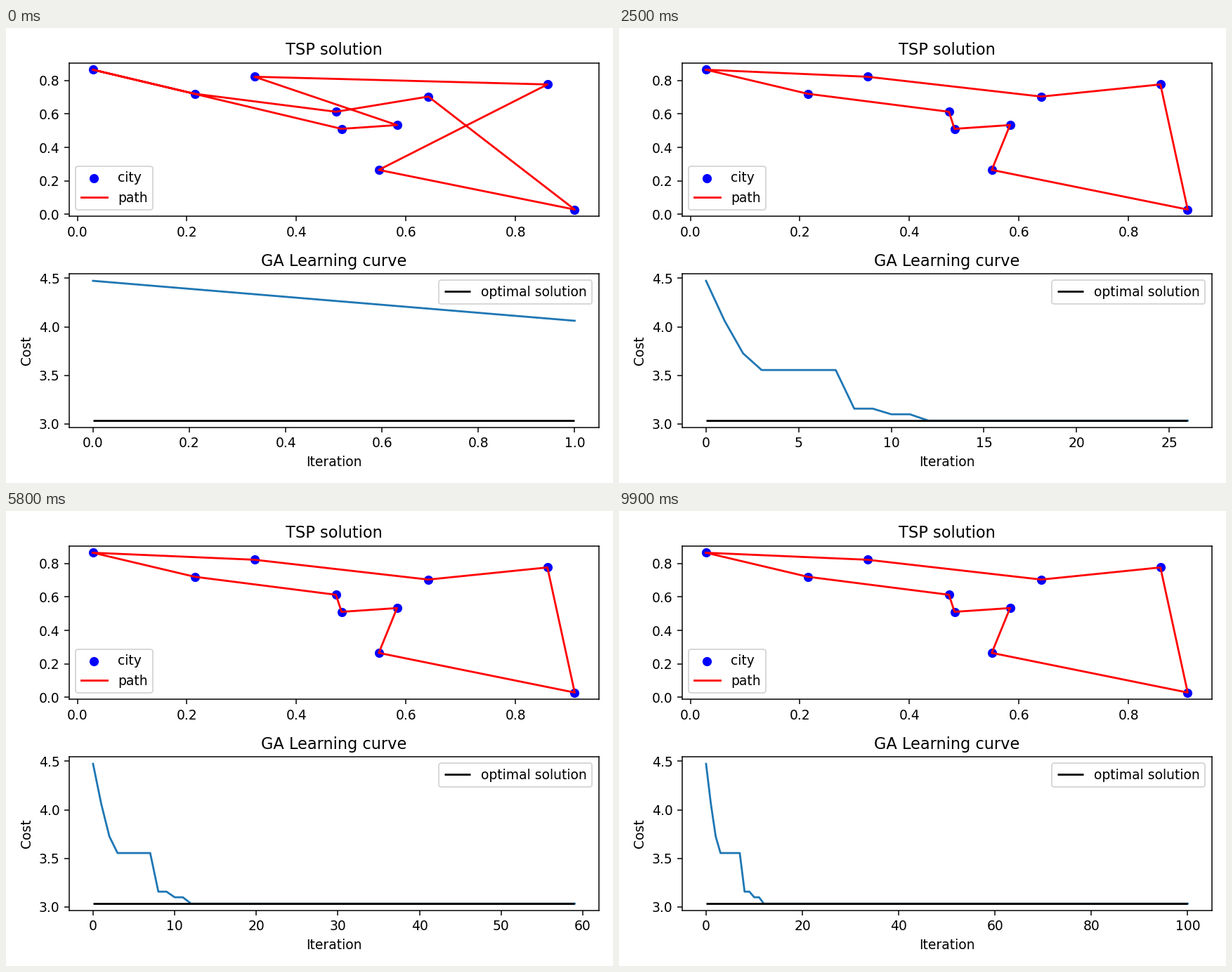
Recreate the animation shown at these times as a matplotlib script. Size 864 by 648 pixels, loop 10 s.

```python
import numpy as np
import matplotlib.pyplot as plt
from matplotlib.animation import FuncAnimation

plt.rcParams["font.family"] = "DejaVu Sans"

FRAMES = 100
CITIES = dict(
    A=(0.0286, 0.8640), B=(0.2143, 0.7205), C=(0.3234, 0.8222),
    D=(0.4722, 0.6130), E=(0.4825, 0.5110), F=(0.5838, 0.5335),
    G=(0.5505, 0.2657), H=(0.6410, 0.7038), I=(0.8585, 0.7762),
    J=(0.9083, 0.0289),
)

# Best tour, keyed by the iteration that discovers it
TOURS = {
    1: "ABDHJGICFE",
    2: "ACBDHJGIFE",
    3: "ABCJGFEDIH",
    8: "ABCDEFGJIH",
    10: "ACDEFGJIHB",
    12: "ACHIJGFEDB",
}
OPTIMUM = 3.0342
COSTS = np.full(FRAMES + 1, OPTIMUM)
COSTS[:3] = 4.473, 4.062, 3.726
COSTS[3:8] = 3.555
COSTS[8:10] = 3.1575
COSTS[10:12] = 3.0996


def tour_points(iteration):
    tour = TOURS[max(i for i in TOURS if i <= iteration)]
    return np.array([CITIES[c] for c in tour + tour[0]]).T


fig, (ax_map, ax_cost) = plt.subplots(2, 1, figsize=(6.4, 4.8), dpi=135)

ax_map.set_title("TSP solution")
ax_map.scatter(*np.array(list(CITIES.values())).T, color="blue", label="city")
path, = ax_map.plot(*tour_points(1), color="red", label="path")
ax_map.legend(loc="lower left")

ax_cost.set_title("GA Learning curve")
ax_cost.set_xlabel("Iteration")
ax_cost.set_ylabel("Cost")
curve, = ax_cost.plot([0, 1], COSTS[:2])
best = ax_cost.hlines(OPTIMUM, 0, 1, color="black", label="optimal solution")
ax_cost.legend(loc="upper right")


def update(frame):
    n = frame + 1
    path.set_data(*tour_points(n))
    curve.set_data(np.arange(n + 1), COSTS[:n + 1])
    best.set_segments([[(0, OPTIMUM), (n, OPTIMUM)]])
    ax_cost.set_xlim(-0.05 * n, 1.05 * n)
    return path, curve, best


update(0)
fig.tight_layout()

anim = FuncAnimation(fig, update, frames=FRAMES, interval=100,
                     repeat=True, repeat_delay=0, blit=False)
plt.show()
```
